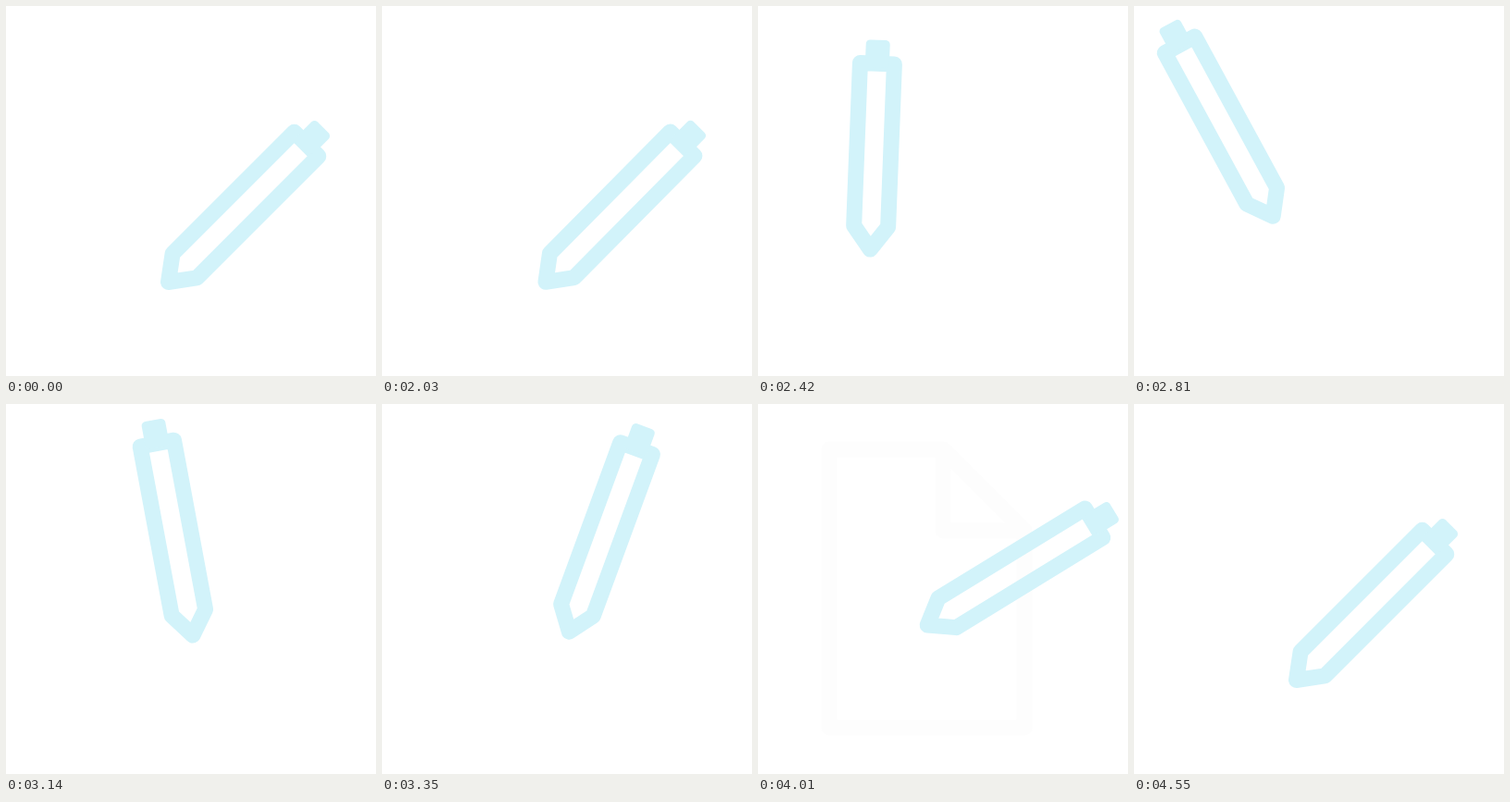
Write an HTML page that moves like this. It is 400 px wide and 400 px high and loops after 4.58 s.

```html
<!DOCTYPE html>
<html lang="en">
<head>
<meta charset="utf-8">
<title>Pen</title>
<style>
html, body { margin: 0; width: 100%; height: 100%; overflow: hidden; background: #fff; }
svg { display: block; width: 100%; height: 100%; }
#page, #body { fill: none; stroke-width: 17; stroke-linejoin: round; }
#page { stroke: #fdfdfd; }
#body { stroke: #d2f3fa; }
#cap { fill: #d2f3fa; }
</style>
</head>
<body>
<svg viewBox="0 0 400 400">
  <path id="page" d="M77 49H200L288 137V350H77ZM200 49V137H288"/>
  <g id="pen">
    <path id="body"/>
    <rect id="cap" x="-13" width="26" height="30" rx="4.5"/>
  </g>
</svg>
<script>
const LOOP = 4580, START = 2030, STEP = 30;
const $ = id => document.getElementById(id);
const page = $('page'), pen = $('pen'), body = $('body'), cap = $('cap');

const ease = u => (1 - Math.cos(Math.PI * Math.min(1, Math.max(0, u)))) / 2;

// Swings smoothly from one turning point [time, value] to the next
const swing = (first, ...rest) => t => {
  let [from, value] = first;
  for (const [to, next] of rest) {
    if (t < to) return value + (next - value) * ease((t - from) / (to - from));
    [from, value] = [to, next];
  }
  return value;
};

const tipX = swing([1930, 175.5], [2030, 177], [2500, 117], [3241, 206],
                   [3790, 167], [4030, 183.5], [4310, 166], [4550, 175.5]);
const tipY = swing([2000, 298.5], [2845, 227], [3246, 254.5], [3690, 190.5], [4375, 298.5]);
const tilt = swing([2000, 45], [2760, -28.5], [2875, -28.5], [3758, 58.5], [4130, 58.5], [4550, 45]);
const barrel = swing([1930, 186], [2420, 176], [2750, 186]);

function draw(now) {
  const t = now % LOOP;
  const s = t < START ? 0 : START + Math.floor((t - START) / STEP) * STEP;
  const top = -25 - barrel(s);
  pen.setAttribute('transform', `translate(${tipX(s)} ${tipY(s)}) rotate(${tilt(s)})`);
  body.setAttribute('d', `M0 0L-18.5 -25V${top}H18.5V-25Z`);
  cap.setAttribute('y', top - 25.5);
  page.style.opacity = s >= 3500 && s < 4200 ? 1 : 0;
}

const origin = performance.now();
function tick() {
  draw(performance.now() - origin);
  requestAnimationFrame(tick);
}
tick();
</script>
</body>
</html>
```
